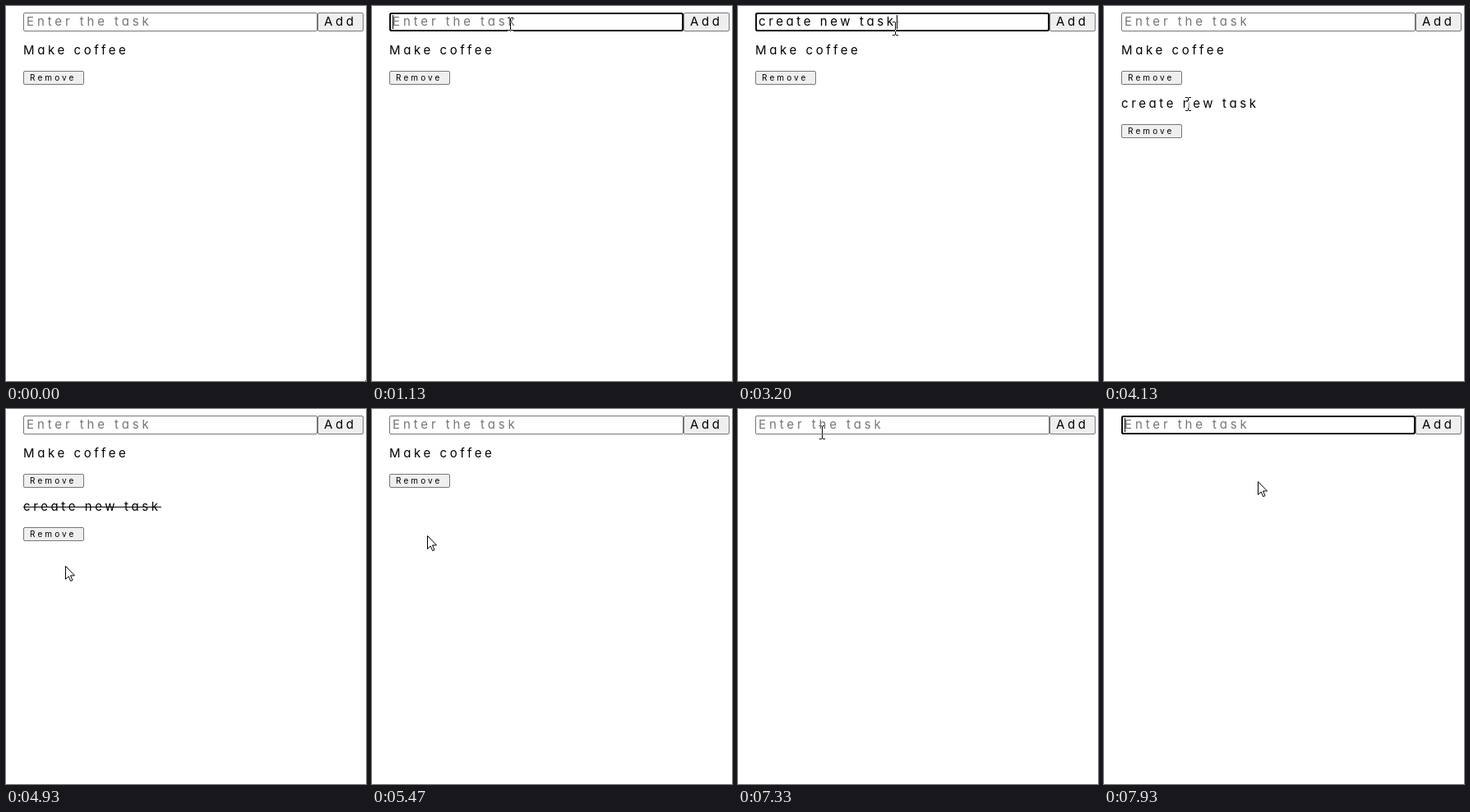
These frames come from a looping animation (438x457 px, 8 s). An HTML page:

```html
<!DOCTYPE html>
<html lang="en">
<head>
<meta charset="utf-8">
<title>Task list</title>
<style>
  html, body { margin: 0; width: 100%; height: 100%; overflow: hidden; background: #fff; }
  svg { display: block; width: 438px; height: 457px; }
  text {
    font: 15px Inter, "Open Sans", sans-serif;
    font-feature-settings: "cv11";
    letter-spacing: 3.6px;
    white-space: pre;
  }
  .hint { fill: #757575; letter-spacing: 3.9px; }
  .small text { font-size: 10px; letter-spacing: 3.1px; }
  #field { fill: #fff; stroke: #767676; }
  #focus { fill: none; stroke: #101010; stroke-width: 2; }
  .button rect { fill: #efefef; stroke: #767676; }
  .button.hover rect { fill: #e2e2e2; }
  .strike { stroke: #000; }
  #beam { fill: none; stroke: #fff; mix-blend-mode: difference; }
  #arrow { fill: #fff; stroke: #000; }
</style>
</head>
<body>
<svg viewBox="0 0 438 457">
  <rect width="438" height="457" fill="#fff"/>
  <rect id="field" x="21.5" y="8.5" width="357" height="22" rx="1.5"/>
  <rect id="focus" x="22" y="9" width="356" height="21" rx="2"/>
  <text id="hint" class="hint" x="25" y="24">Enter the task</text>
  <text id="typed" x="25" y="24"></text>
  <rect id="caret" y="11" width="1" height="17"/>
  <g id="add" class="button">
    <rect x="379.5" y="8.5" width="55" height="22" rx="1.5"/>
    <text x="387" y="24">Add</text>
  </g>
  <g id="list"></g>
  <path id="beam" d="M-3-7.5h3m1 0h3M.5-7v15M-3 8.5h3m1 0h3"/>
  <path id="arrow" d="M.5.5V16.5L4.2 13 6.7 18.7 9 17.7 6.5 12H11.5Z"/>
</svg>
<script>
const LOOP = 8000, TICKS = 120;
const NEW_TASK = 'create new task';
const $ = id => document.getElementById(id);
const show = (el, on) => { el.style.display = on ? '' : 'none'; };

// Pointer trips between rests, in ticks; dip bends the path downwards
const trips = [
  { start: 0, end: 3, x: 230, y: 457 },
  { start: 6, end: 11, x: 172, y: 10 },
  { start: 12, end: 17, x: 168, y: 22 },
  { start: 18, end: 23, x: 191, y: 27 },
  { start: 53, end: 57, x: 402, y: 20 },
  { start: 58, end: 62, x: 102, y: 119 },
  { start: 67, end: 78, x: 67, y: 154, dip: 104 },
  { start: 82, end: 89, x: 92, y: 63, dip: 240 },
  { start: 99, end: 102, x: 60, y: 88 },
  { start: 108, end: 119, x: 187, y: 88, dip: -70 }
];

const tasks = [
  { label: 'Make coffee', added: 0, done: 98, removed: 108 },
  { label: NEW_TASK, added: 58, done: 67, removed: 81 }
];

tasks.forEach((task, i) => { task.top = 65 * i; });
$('list').innerHTML = tasks.map(({ label, top }) => `
  <g transform="translate(0 ${top})">
    <text x="21" y="59">${label}</text>
    <line class="strike" x1="21" y1="54.5" y2="54.5"/>
    <g class="button small">
      <rect x="21.5" y="79.5" width="73" height="16" rx="1.5"/>
      <text x="29" y="91">Remove</text>
    </g>
  </g>`).join('');

tasks.forEach((task, i) => {
  task.el = $('list').children[i];
  [task.text, task.strike, task.button] = task.el.children;
});

function pointerAt(tick) {
  let x = 437, y = 456;
  for (const trip of trips) {
    if (tick < trip.start) break;
    const k = Math.min(1, (tick - trip.start) / (trip.end - trip.start));
    const eased = k * (2 - k);
    x += (trip.x - x) * eased;
    y += (trip.y - y) * eased + (trip.dip || 0) * Math.sin(Math.PI * eased);
  }
  return [Math.round(x), Math.round(y)];
}

// The first word comes slowly, the rest one letter per tick
function lettersAt(tick) {
  if (tick < 19 || tick >= 58) return 0;
  if (tick < 35) return Math.min(7, 1 + Math.floor((tick - 19) * 6 / 11));
  return Math.min(NEW_TASK.length, tick - 27);
}

function render(ms) {
  const tick = Math.floor((ms + 4) / LOOP * TICKS) % TICKS;
  const [x, y] = pointerAt(tick);
  const over = (left, top, right, bottom) => x >= left && x < right && y >= top && y < bottom;

  const focused = (tick >= 11 && tick < 58) || tick >= 112;
  const letters = lettersAt(tick);
  $('typed').textContent = NEW_TASK.slice(0, letters);
  show($('hint'), !letters);
  show($('focus'), focused);
  show($('caret'), focused);
  $('caret').setAttribute('x', 25 + (letters && Math.round($('typed').getComputedTextLength())));
  $('add').classList.toggle('hover', over(379, 8, 435, 31));

  let overText = over(21, 8, 379, 31);
  for (const { el, text, strike, button, top, added, done, removed } of tasks) {
    const present = tick >= added && tick < removed;
    show(el, present);
    show(strike, tick >= done);
    if (!present) continue;
    const right = 21 + text.getComputedTextLength();
    strike.setAttribute('x2', Math.round(right));
    button.classList.toggle('hover', over(21, 79 + top, 95, 96 + top));
    overText ||= over(21, 44 + top, right, 65 + top);
  }

  for (const id of ['beam', 'arrow']) {
    $(id).setAttribute('transform', `translate(${x} ${y})`);
    show($(id), overText === (id === 'beam'));
  }
}

const start = performance.now();
function frame() {
  render((performance.now() - start) % LOOP);
  requestAnimationFrame(frame);
}
frame();
</script>
</body>
</html>
```
